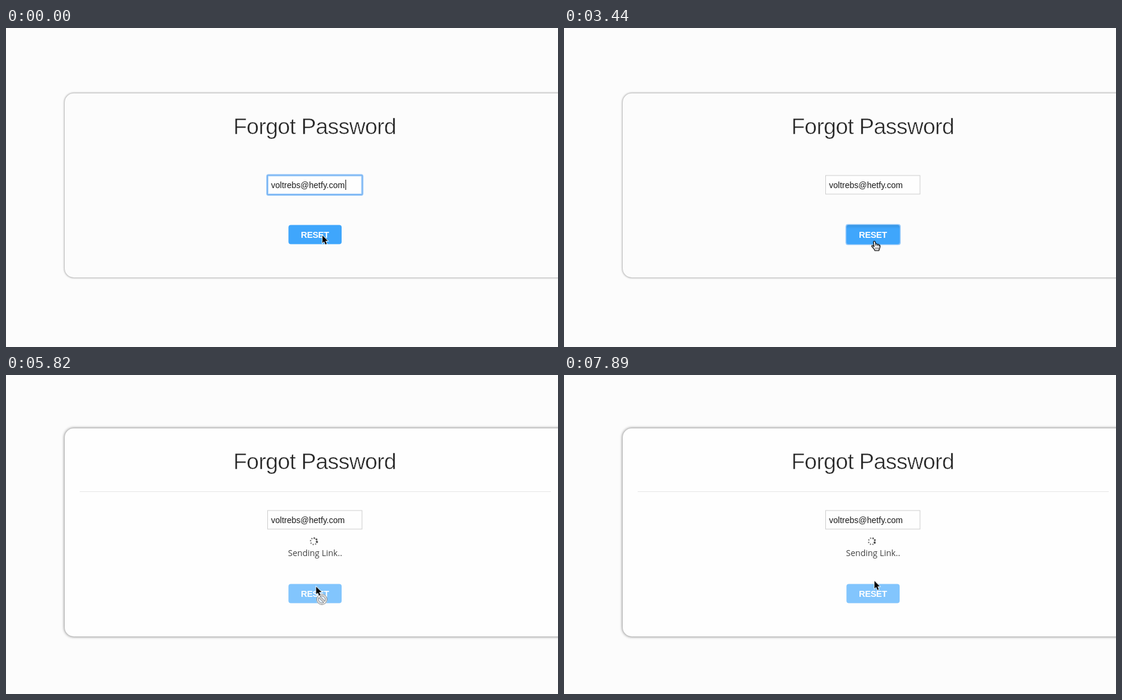
Write an HTML page that moves like this. It is 921x532 px and loops after 8000 ms.

```html
<!DOCTYPE html>
<html lang="en">
<head>
<meta charset="utf-8">
<title>Forgot Password</title>
<style>
  html, body { margin: 0; width: 100%; height: 100%; overflow: hidden; background: #fcfcfc; }
  body { position: relative; }
  svg { position: absolute; left: 0; top: 0; }
  text { font-family: "Liberation Sans", Arial, sans-serif; }

  .card { position: absolute; left: 97.5px; width: 900px; border-radius: 15px; }

  .title {
    font-size: 37.3px; letter-spacing: -.7px; text-anchor: middle;
    fill: #262626; stroke: #fcfcfc; stroke-width: .6px;
  }
  .email { font-size: 14px; fill: #1c1c1c; }
  .reset { font-size: 14.5px; letter-spacing: -.35px; font-weight: bold; fill: #fff; text-anchor: middle; }
  .status { font: 14px "Open Sans", sans-serif; fill: #444; text-anchor: middle; }

  /* Every change is a hard cut on one shared 8 s clock. */
  .card, .busy, .focus, .blur, .pressed, .caret, .head, .button, .arrow, .hand, .denied {
    animation: 8s step-end infinite;
  }
  .card { animation-name: grow; }
  .busy { animation-name: from-busy; }
  .focus { animation-name: until-press; }
  .blur { animation-name: from-press; }
  .pressed { animation-name: press; }
  .caret { animation-name: blink; }
  .head { animation-name: lift; }
  .button { animation-name: drop; }
  .arrow { animation-name: arrow; }
  .hand { animation-name: hand; }
  .denied { animation-name: denied; }
  .spinner { animation: spin 8s linear infinite; }

  @keyframes grow {
    0% {
      top: 108.5px; height: 307px; background: #fcfcfc;
      box-shadow: 0 0 3px 1px rgba(0, 0, 0, .32);
    }
    44.875%, 100% {
      top: 88.5px; height: 347px; background: #fefefe;
      box-shadow: 0 0 4px 1px rgba(0, 0, 0, .42);
    }
  }
  @keyframes from-busy { 0% { opacity: 0 } 44.875%, 100% { opacity: 1 } }
  @keyframes until-press { 0% { opacity: 1 } 43%, 100% { opacity: 0 } }
  @keyframes from-press { 0% { opacity: 0 } 43%, 100% { opacity: 1 } }
  @keyframes press { 0% { opacity: 0 } 43% { opacity: 1 } 44.875%, 100% { opacity: 0 } }
  @keyframes blink {
    0%, 11.25%, 24.375%, 35.5% { opacity: 1 }
    5.625%, 16.875%, 29.875%, 43%, 100% { opacity: 0 }
  }
  @keyframes lift {
    0% { transform: none }
    44.875%, 100% { transform: translateY(-20px) }
  }
  @keyframes drop {
    0% { transform: none; opacity: 1 }
    44.875%, 100% { transform: translateY(20px); opacity: .65 }
  }
  @keyframes arrow {
    0% { transform: translate(528px, 346px); opacity: 1 }
    31.75% { transform: translate(528px, 346px); opacity: 0 }
    44.875% { transform: translate(517.5px, 353px); opacity: 1 }
    76.5%, 100% { transform: translate(518px, 343.5px); opacity: 1 }
  }
  @keyframes hand {
    0% { transform: translate(533px, 348px); opacity: 0 }
    31.75% { transform: translate(533px, 348px); opacity: 1 }
    33.625% { transform: translate(538px, 350px); opacity: 1 }
    35.5% { transform: translate(545px, 350.5px); opacity: 1 }
    37.375% { transform: translate(533px, 353px); opacity: 1 }
    39.25% { transform: translate(518px, 355.5px); opacity: 1 }
    44.875%, 100% { transform: translate(518px, 355.5px); opacity: 0 }
  }
  @keyframes denied { 0% { opacity: 0 } 44.875% { opacity: 1 } 76.5%, 100% { opacity: 0 } }
  /* One turn takes 2 s, shown in steps of about 148 ms. */
  @keyframes spin {
    0% { transform: rotate(-12deg) }
    43% { transform: rotate(-12deg); animation-timing-function: steps(31, end) }
    100% { transform: rotate(816deg) }
  }
</style>
</head>
<body>
<div class="card"></div>

<svg width="921" height="532" viewBox="0 0 921 532">
  <defs>
    <linearGradient id="shade" x2="0" y2="1">
      <stop offset="0" stop-opacity=".1"/>
      <stop offset=".2" stop-opacity="0"/>
    </linearGradient>
  </defs>

  <rect class="busy" x="123" y="194" width="786" height="1" fill="#e6e6e6"/>

  <g class="head">
    <text class="title" x="515" y="177.3">Forgot Password</text>
    <rect x="436.5" y="246.5" width="157" height="30.5" fill="#fefefe"/>
    <rect class="blur" x="436.5" y="246" width="157.5" height="31" fill="none" stroke="#cdcdcd"/>
    <g class="focus" fill="none">
      <rect x="436" y="245.5" width="158.5" height="32.5" rx="2" stroke="#b8d9fb" stroke-width="4"/>
      <rect x="436" y="245.5" width="158.5" height="32.5" rx="1.5" stroke="#7ab5f3" stroke-width="2"/>
    </g>
    <text class="email" x="442.3" y="267">voltrebs@hetfy.com</text>
    <rect class="caret" x="566.2" y="253" width="1.2" height="17" fill="#222"/>
  </g>

  <g class="busy">
    <g transform="translate(513.5 277.3)"><g class="spinner" id="spinner" fill="#333"></g></g>
    <text class="status" x="515.7" y="302">Sending Link..</text>
  </g>

  <g class="button">
    <rect class="pressed" x="470" y="327.3" width="91.5" height="34.4" rx="3.5" fill="#7dbdf9" stroke="#b0d6fb"/>
    <rect x="471.3" y="328.6" width="88.7" height="32" rx="4" fill="#3fa6fc"/>
    <rect class="pressed" x="471.3" y="328.6" width="88.7" height="32" rx="4" fill="url(#shade)"/>
    <text class="reset" x="515.4" y="350">RESET</text>
  </g>

  <g class="denied" fill="none" transform="translate(527 374.3)">
    <circle r="9.2" fill="#fff"/>
    <circle r="7.2" fill="#e3eefa" stroke="#6b6b6b" stroke-width="3.4"/>
    <path d="M-5 -5L5 5" stroke="#6b6b6b" stroke-width="3.4"/>
    <circle r="7.2" stroke="#fff" stroke-width="1.6"/>
    <path d="M-5 -5L5 5" stroke="#fff" stroke-width="1.6"/>
  </g>

  <path class="arrow" d="M0 0V12.6L2.8 9.9L5 15L7.2 14L5 9.1H9Z"
        stroke="#fff" stroke-width="1.6" paint-order="stroke"/>

  <g class="hand" fill="#fff" stroke="#000" stroke-width="1.25" stroke-linejoin="round">
    <path d="M-1.8 1.5Q-1.8 0 -.3 0Q1 0 1.4 1.5L2.2 5.2Q2.6 4.2 3.8 4.5Q5 4.8 5 6
             Q5.6 5 6.6 5.4Q7.6 5.8 7.6 7Q8.2 6.2 9 6.8Q9.8 7.4 9.4 9L8.6 12L7.5 15.5H.5
             Q0 13.5 -1.5 12L-4.3 9Q-5 7.8 -3.9 7.3Q-2.8 7 -1.8 8.2L-.6 9.2Z"/>
    <path d="M2.2 5.2V8M5 6V8.3M7.6 7V8.8M2 10.5V13.3M4.3 10.5V13.3M6.6 10.5V13.3"
          fill="none" stroke-width=".9"/>
  </g>
</svg>

<script>
  // Eight dots, clockwise from the right; the one at upper right is largest.
  const sizes = [1, 1, 1, 1, 1, 1.25, 1.5, 1.75];
  document.getElementById('spinner').innerHTML = sizes.map((r, i) => {
    const a = i * Math.PI / 4;
    const d = i % 2 ? 5.4 : 5.5;
    return `<circle cx="${d * Math.cos(a)}" cy="${d * Math.sin(a)}" r="${r}"/>`;
  }).join('');
</script>
</body>
</html>
```
